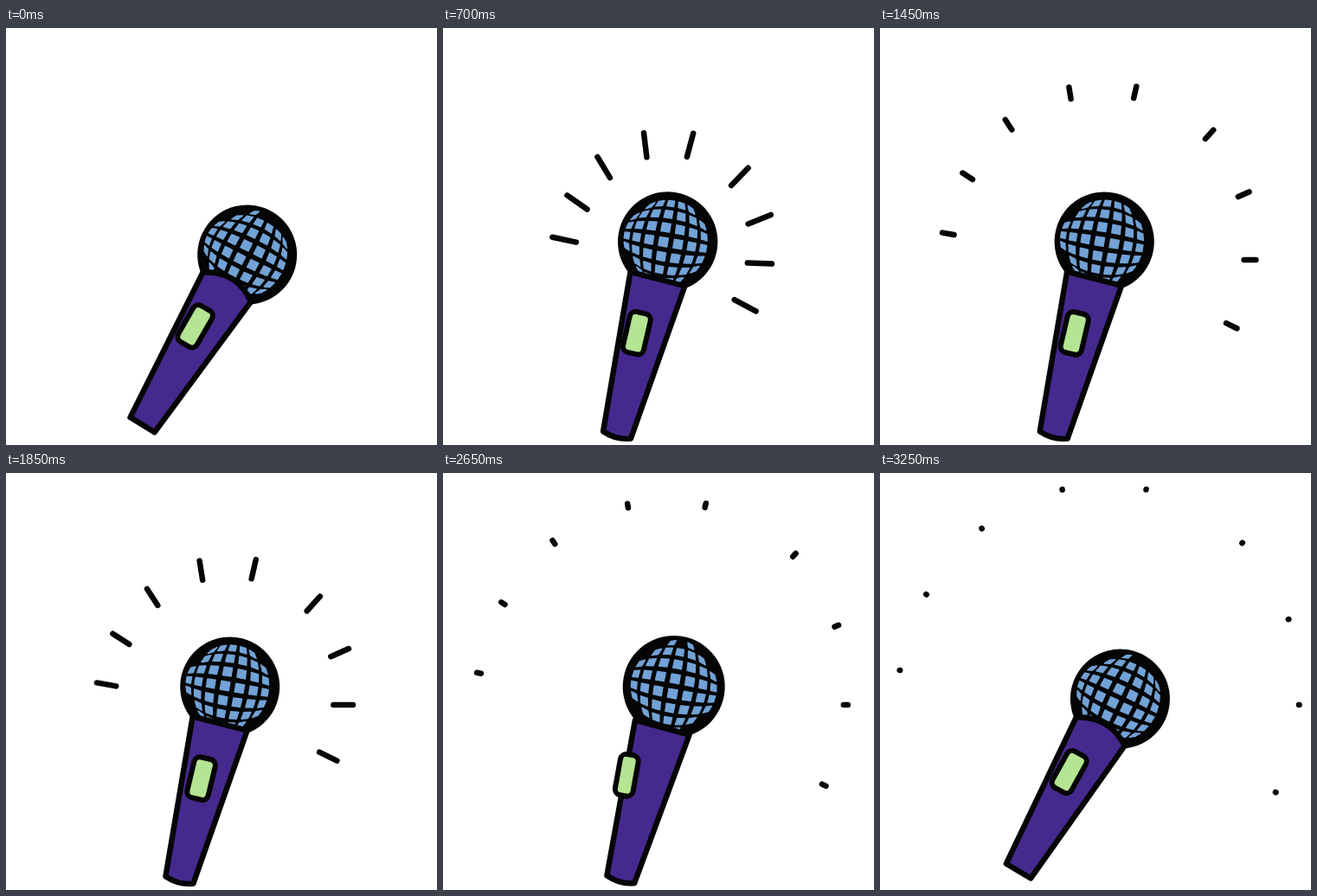
Recreate the animation shown at these times as an HTML page with a canvas. Size 498 by 482 pixels, loop 3300 ms.

```html
<!DOCTYPE html>
<html lang="en">
<head>
<meta charset="utf-8">
<title>Microphone</title>
<style>
html, body { margin: 0; width: 100%; height: 100%; overflow: hidden; background: #fff; }
canvas { display: block; }
</style>
</head>
<body>
<canvas id="stage" width="498" height="482"></canvas>
<script>
const ctx = document.getElementById('stage').getContext('2d');
const LOOP = 3300, STEP = 50;
const BURST_START = 592, BURST = 533.3, BURSTS = 5;
const INK = '#050505', PURPLE = '#46298e', GREEN = '#b4e592', BLUE = '#72a2d6';
const RAD = Math.PI / 180;
const RAY_ANGLES = [190, 213, 237, 261, 283, 312, 336, 360, 386];

// smooth 0 to 1 between two times
function ramp(t, from, to) {
  const p = Math.min(1, Math.max(0, (t - from) / (to - from)));
  return p * p * (3 - 2 * p);
}

function fillStroke(fill, stroke, width) {
  ctx.fillStyle = fill;
  ctx.strokeStyle = stroke;
  ctx.lineWidth = width;
  ctx.fill();
  ctx.stroke();
}

// Each burst flies outward at constant speed while its dashes shrink to dots.
function drawRays(t) {
  const n = (t - BURST_START) / BURST;
  if (n < 0 || n >= BURSTS) return;
  const p = n % 1, travel = 1.56 * p - .56;
  const half = 11.3 * (1 - travel) * Math.min(1, p / .12);
  const turn = 2 * (1 - ramp(t, 1050, 1450));
  ctx.strokeStyle = INK;
  ctx.lineWidth = 6.5;
  ctx.beginPath();
  RAY_ANGLES.forEach((angle, i) => {
    const a = (angle + turn) * RAD, dx = Math.cos(a), dy = Math.sin(a);
    const d = 136 + 25 * Math.sin(Math.PI * i / 8) ** 2 + 97 * travel;
    ctx.moveTo(250 + dx * (d - half), 268 + dy * (d - half));
    ctx.lineTo(250 + dx * (d + half + .01), 268 + dy * (d + half));
  });
  ctx.stroke();
}

// Tiles on a ball, bulging in both directions.
function drawGrille(r, roll, lift) {
  const spot = (u, v) => [r * Math.sin(u) * Math.cos(v * .85), r * Math.sin(v) * Math.cos(u * .8)];
  const half = .088;
  for (let i = -4; i <= 4; i++) {
    for (let j = -4; j <= 4; j++) {
      const u = i * .3 + roll, v = j * .3 + lift;
      if (Math.hypot(...spot(u, v)) > r * .87 || Math.hypot(u, v) > 1.15) continue;
      ctx.beginPath();
      for (const [a, b] of [[-1, -1], [1, -1], [1, 1], [-1, 1]])
        ctx.lineTo(...spot(u + a * half, v + b * half));
      ctx.closePath();
      fillStroke(BLUE, BLUE, 1.4);
    }
  }
}

function drawMic(t) {
  const lean = 1 - ramp(t, 0, 400) + ramp(t, 2700, 3350);
  const hop = Math.sin(Math.PI * Math.min(1, t / 550) ** 1.5);
  const twist = t < 600 ? 0 : ((1 + Math.cos(2 * Math.PI * (t - 1050) / 1600)) / 2) ** 4 * (1 - lean);
  const r = 57.5 + 1.5 * twist;

  ctx.save();
  ctx.translate(258.7 + 20 * lean + 8 * twist, 247 + 15 * lean - 35 * hop);
  ctx.rotate((14.5 + 17 * lean + .8 * twist) * RAD);

  ctx.beginPath();
  ctx.arc(0, 0, r, 0, 2 * Math.PI);
  ctx.fillStyle = INK;
  ctx.fill();
  ctx.save();
  ctx.rotate(-5 * RAD);
  drawGrille(r, -.1 + .1 * twist, .14 * Math.max(twist, lean));
  ctx.restore();

  const top = 44 + 5 * twist;
  ctx.beginPath();
  ctx.moveTo(-33, top);
  ctx.quadraticCurveTo(0, top - 22 * lean, 32, top);
  ctx.lineTo(16, 231);
  ctx.quadraticCurveTo(0, 231 + 6 * (1 - lean - hop), -17, 231);
  ctx.closePath();
  fillStroke(PURPLE, INK, 6.4);

  const side = -5.5 - 2.5 * lean - 20 * twist, width = 25 - 4 * twist;
  ctx.translate(side, 111 - 9 * lean + 2 * twist - 35 * hop);
  ctx.rotate(side * .2 * RAD);
  ctx.beginPath();
  ctx.roundRect(-width / 2, -24, width, 48, 7);
  fillStroke(GREEN, INK, 6);
  ctx.restore();
}

function frame() {
  const t = Math.floor(performance.now() % LOOP / STEP) * STEP;
  ctx.fillStyle = '#fff';
  ctx.fillRect(0, 0, 498, 482);
  ctx.lineCap = ctx.lineJoin = 'round';
  drawRays(t);
  drawMic(t);
  requestAnimationFrame(frame);
}
frame();
</script>
</body>
</html>
```
